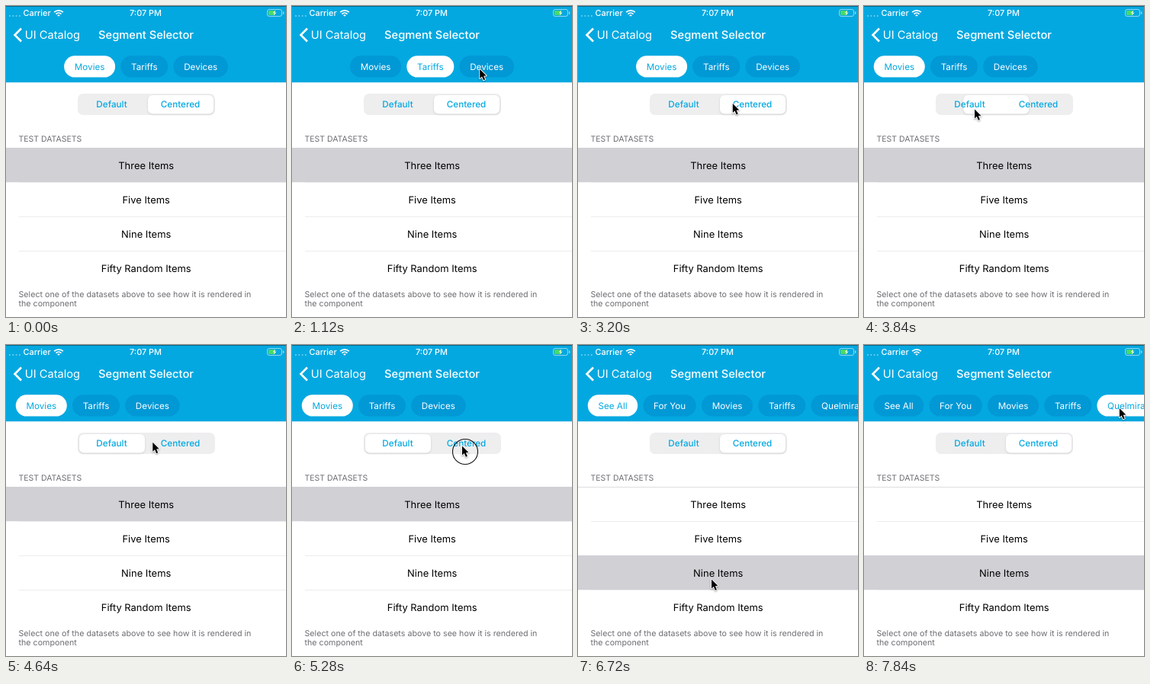
An HTML page with a canvas for the animation above (8000 ms loop, 367 px wide and 408 px high).

```html
<!DOCTYPE html>
<html lang="en">
<head>
<meta charset="utf-8">
<title>Segment Selector</title>
<style>
  html, body { margin: 0; width: 100%; height: 100%; overflow: hidden; background: #fff; }
  canvas { display: block; width: 367px; height: 408px; }
</style>
</head>
<body>
<canvas id="stage"></canvas>
<script>
const W = 367, H = 408, LOOP = 8000, STEP = 160;
const LIST_TOP = 186, ROW_H = 45;
const BLUE = '#04a8e0', PILL = '#0098d5', GREY = '#6d6d72';
const FONT = 'Inter, Roboto, sans-serif';

const canvas = document.getElementById('stage');
const ctx = canvas.getContext('2d');
const dpr = window.devicePixelRatio || 1;
canvas.width = W * dpr;
canvas.height = H * dpr;
ctx.scale(dpr, dpr);
ctx.textRendering = 'geometricPrecision';

const ROWS = ['Three Items', 'Five Items', 'Nine Items', 'Fifty Random Items'];
const DATASETS = {
  0: ['Movies', 'Tariffs', 'Devices'],
  2: ['See All', 'For You', 'Movies', 'Tariffs', 'Quelmira']
};

// Each click takes effect one step after the press; side 1 is "Centered".
const CLICKS = [
  { at: 640, pill: 1 },
  { at: 1280, pill: 2 },
  { at: 1920, side: 0 },
  { at: 2720, side: 1 },
  { at: 3680, side: 0 },
  { at: 5280, side: 1 },
  { at: 6560, row: 2, rest: 2 * STEP },
  { at: 7680, pill: 4 }
];

function stateAt(t) {
  const state = { pill: 0, side: 1, row: 0, toggled: -LOOP };
  for (const { at, pill = 0, side = state.side, row = state.row } of CLICKS) {
    const done = at + STEP;
    if (done > t) break;
    if (side !== state.side) state.toggled = done;
    Object.assign(state, { pill, side, row });
  }
  return state;
}

const pillFont = `11.7px ${FONT}`;

function layoutPills({ row, side }) {
  const gap = 7.2, padding = 27.3;
  ctx.font = pillFont;
  const pills = DATASETS[row].map(label => ({ label, width: ctx.measureText(label).width + padding }));
  const total = pills.reduce((sum, p) => sum + p.width + gap, -gap);
  let x = side && total < W ? (W - total) / 2 : 12.8;
  for (const p of pills) {
    p.x = x;
    x += p.width + gap;
  }
  return pills;
}

function spotOf(click) {
  if ('row' in click) return [174, LIST_TOP + ROW_H * (click.row + .5) + 7.5];
  if ('side' in click) return [144 + 78 * click.side, 134 - 3 * click.side];
  const { x, width } = layoutPills(stateAt(click.at))[click.pill];
  return [x + width / 2 - 10, 81.5];
}

function pointerAt(t) {
  const i = CLICKS.findIndex(c => c.at + STEP > t);
  if (i < 0) return spotOf(CLICKS[CLICKS.length - 1]);
  const prev = CLICKS[i - 1];
  const [x0, y0] = prev ? spotOf(prev) : [215, 152];
  const [x1, y1] = spotOf(CLICKS[i]);
  const leave = prev ? prev.at + STEP + (prev.rest || STEP) : STEP;
  const arrive = CLICKS[i].at - STEP;
  const p = Math.min(1, Math.max(0, (t - leave) / (arrive - leave)));
  const e = p * p * (3 - 2 * p);
  return [x0 + (x1 - x0) * e, y0 + (y1 - y0) * e - 6 * Math.sin(Math.PI * p)];
}

function box(x, y, w, h, r, color) {
  ctx.fillStyle = color;
  ctx.beginPath();
  ctx.roundRect(x, y, w, h, r);
  ctx.fill();
}

function text(str, x, y, size, color, { align = 'left', weight = 400 } = {}) {
  ctx.font = `${weight} ${size}px ${FONT}`;
  ctx.textAlign = align;
  ctx.fillStyle = color;
  ctx.fillText(str, x, y);
}

function tracePath(points) {
  ctx.beginPath();
  points.forEach(([x, y]) => ctx.lineTo(x, y));
}

function drawStatus() {
  for (let i = 0; i < 4; i++) box(4 + i * 4.3, 12, 2, 2, 1, 'rgba(255,255,255,.45)');
  text('Carrier', 22.5, 13.3, 10.9, '#fff', { weight: 500 });
  text('7:07 PM', 183, 13.3, 10.9, '#fff', { align: 'center', weight: 500 });

  // Wi-Fi
  ctx.strokeStyle = '#fff';
  ctx.lineWidth = 1.8;
  for (let r = 1.6; r < 9; r += 3.3) {
    ctx.beginPath();
    ctx.arc(69, 14, r, -Math.PI * .75, -Math.PI * .25);
    ctx.stroke();
  }

  // Battery
  ctx.strokeStyle = 'rgba(255,255,255,.55)';
  ctx.lineWidth = 1;
  ctx.beginPath();
  ctx.roundRect(342.5, 4.5, 19, 9, 2.5);
  ctx.stroke();
  box(363, 7.3, 1.3, 3.5, .6, 'rgba(255,255,255,.6)');
  box(344, 6, 9, 6, 1, '#4cd964');
  tracePath([[353.3, 5.5], [349.5, 9.6], [352, 9], [350.7, 12.6], [354.6, 8.4], [352, 9]]);
  ctx.fillStyle = '#fff';
  ctx.fill();
}

function drawNavBar() {
  box(0, 0, W, 100.3, 0, BLUE);
  box(0, 0, W, 1, 0, '#07678a');
  drawStatus();
  tracePath([[20, 29.5], [11.5, 38], [20, 46.5]]);
  ctx.strokeStyle = '#fff';
  ctx.lineWidth = 2.6;
  ctx.stroke();
  text('UI Catalog', 24.8, 43.4, 14.65, '#fff');
  text('Segment Selector', 183.5, 43.4, 14.7, '#fff', { align: 'center', weight: 500 });
}

function drawPills(state) {
  layoutPills(state).forEach(({ label, x, width }, i) => {
    const on = i === state.pill;
    box(x, 65.3, width, 28.3, 14.15, on ? '#fff' : PILL);
    text(label, x + width / 2, 83.8, 11.7, on ? BLUE : '#fff', { align: 'center' });
  });
}

function drawSegments({ side, toggled }, t) {
  const p = t - toggled < STEP ? .62 : 1;
  box(94, 115, 180, 28, 7, '#eeeeef');
  ctx.save();
  ctx.shadowColor = 'rgba(0,0,0,.13)';
  ctx.shadowBlur = 3 * dpr;
  ctx.shadowOffsetY = dpr;
  box(96 + 90 * (side ? p : 1 - p), 117, 86, 24.5, 6, '#fff');
  ctx.restore();
  ['Default', 'Centered'].forEach((label, i) =>
    text(label, 138.5 + 90 * i, 133.4, 11.7, BLUE, { align: 'center', weight: 500 }));
}

function drawList(active) {
  text('TEST DATASETS', 16.5, 178.4, 10.5, GREY);
  box(0, LIST_TOP, W, .7, 0, '#d4d4d7');
  ROWS.forEach((label, i) => {
    const y = LIST_TOP + i * ROW_H;
    if (i) box(17, y, W - 17, 1, 0, '#ededef');
    if (i === active) box(0, y, W, ROW_H + .3, 0, '#d1d0d5');
    text(label, 183.7, y + 27.8, 12.95, '#000', { align: 'center' });
  });
  text('Select one of the datasets above to see how it is rendered in', 16.5, 381.5, 10.7, GREY);
  text('the component', 16.5, 394.3, 10.7, GREY);
}

function drawPointer(t) {
  if (t < STEP) return;
  ctx.save();
  ctx.translate(...pointerAt(t));
  if (CLICKS.some(({ at }) => t >= at && t < at + STEP)) {
    ctx.strokeStyle = '#111';
    ctx.lineWidth = 1.1;
    ctx.beginPath();
    ctx.arc(5, 9, 16.5, 0, Math.PI * 2);
    ctx.stroke();
  }
  tracePath([[1, 1.5], [1, 13.5], [3.8, 11], [5.8, 15.8], [7.9, 14.9], [5.9, 10.2], [9.5, 10]]);
  ctx.closePath();
  ctx.lineJoin = 'round';
  ctx.strokeStyle = '#fff';
  ctx.lineWidth = 1.8;
  ctx.shadowColor = 'rgba(0,0,0,.35)';
  ctx.shadowBlur = 2 * dpr;
  ctx.shadowOffsetY = dpr;
  ctx.stroke();
  ctx.shadowColor = 'transparent';
  ctx.fillStyle = '#000';
  ctx.fill();
  ctx.restore();
}

function draw(t) {
  const state = stateAt(t);
  box(0, 0, W, H, 0, '#fff');
  drawNavBar();
  drawPills(state);
  drawSegments(state, t);
  drawList(state.row);
  drawPointer(t);
}

function tick() {
  const t = performance.now() % LOOP;
  draw(Math.floor(t / STEP) * STEP);
  requestAnimationFrame(tick);
}
tick();
</script>
</body>
</html>
```
